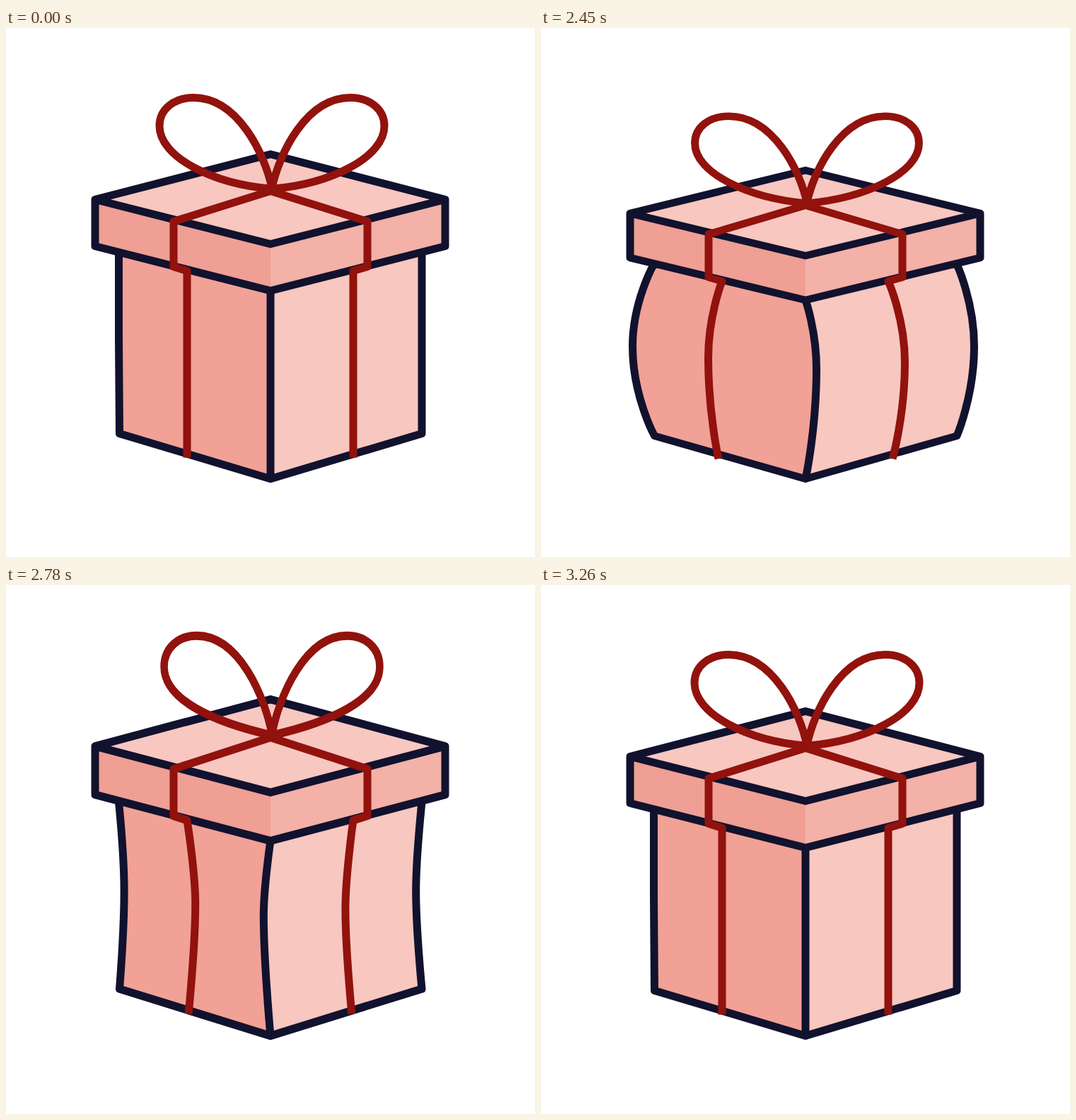
An HTML page that plays this animation: 748x748 px, repeating every 3.35 s.

```html
<!DOCTYPE html>
<html>
<head>
<meta charset="utf-8">
<style>
  html, body { margin: 0; height: 100%; overflow: hidden; background: #fff; }
  svg { display: block; width: 100vw; height: 100vh; }
  .line { fill: none; stroke: #11122e; stroke-width: 11; stroke-linejoin: round; stroke-linecap: round; }
  .ribbon { fill: none; stroke: #92120d; stroke-width: 11; stroke-linejoin: round; }
</style>
</head>
<body>
<svg viewBox="0 0 748 748">
  <g id="gift">
    <path id="body" fill="#f1a196"/>
    <path id="front" fill="#f7c7c0"/>
    <path id="edges" class="line"/>
    <path fill="#ef9f94" d="M126 242L374 305V371L126 308Z"/>
    <path fill="#f3b1a8" d="M621 242L374 305V371L621 308Z"/>
    <path fill="#f7c7c0" d="M126 242L374 178L621 242L374 305Z"/>
    <path class="line" d="M126 242L374 178L621 242L374 305ZV308L374 371L621 308V242"/>
    <path id="band" class="ribbon"/>
    <g id="bow" class="ribbon">
      <path id="loop"/>
      <use href="#loop" transform="matrix(-1 0 0 1 752 0)"/>
    </g>
  </g>
</svg>
<script>
const LOOP = 3350, START = 2000, STEP = 30, LAST = 42;
const set = (id, name, value) => document.getElementById(id).setAttribute(name, value);

// [step, value] keys with linear motion between them
const stretchKeys = [[0, 1], [8, .9677], [16, .948], [22.5, 1.061], [24, 1.061], [29, 1], [32, .988], [37, 1.005], [42, 1]];
const bulgeKeys = [[0, 0], [8, 1], [16, 1], [23, -1], [24, -1], [29, -.23], [32, .1], [37, -.04], [42, 0]];
const bowKeys = [[0, 0], [8, 1], [15.5, 0], [24, 1], [32, 0], [42, 0]];

function at(keys, step) {
  const i = Math.max(1, keys.findIndex(k => k[0] >= step));
  const [t0, v0] = keys[i - 1], [t1, v1] = keys[i];
  return v0 + (v1 - v0) * (step - t0) / (t1 - t0);
}

// Bent edge from a to b through the middle point m
function bend(a, m, b, bulge) {
  const round = .55 * Math.abs(bulge);
  const before = m[1] + (a[1] - m[1]) * round;
  const after = m[1] + (b[1] - m[1]) * round;
  return `${a}C${a} ${m[0]} ${before} ${m}C${m[0]} ${after} ${b} ${b}`;
}

function draw(step) {
  const stretch = at(stretchKeys, step), bulge = at(bulgeKeys, step), lift = at(bowKeys, step);
  const shift = (out, back) => bulge > 0 ? bulge * out : -bulge * back;

  const left = bend([159.5, 318], [159.5 + shift(-30, 11), 440], [160.5, 573], bulge);
  const right = bend([588, 573], [588 + shift(24.5, -12), 440], [588, 318], bulge);
  const middle = bend([374, 371], [374 + shift(15.5, -14), 473], [374, 637], bulge);
  const outline = `M${left}L374 637L${right}Z`;
  set('body', 'd', outline);
  set('front', 'd', `M${middle}L${right}Z`);
  set('edges', 'd', `${outline}M${middle}`);

  const bandLeft = bend([256 + shift(-5, 3), 607], [256 + shift(-19.5, 17), 457], [256, 343], bulge);
  const bandRight = bend([491, 343], [491 + shift(23.5, -16), 464], [491 + shift(6, -3), 607], bulge);
  set('band', 'd', `M${bandLeft}L237 337V273L374 230L511 273V337L${bandRight}`);

  set('loop', 'd', `M376 226C366 178 328 98 265 98C238 98 217 114 217 138C217 182 292 ${220 - 13 * lift} 376 227`);
  set('bow', 'transform',
    `translate(376 226) scale(${1 - .055 * lift} ${1 + .07 * lift}) translate(-376 -226)`);
  set('gift', 'transform', `translate(0 638.5) scale(1 ${stretch}) translate(0 -638)`);
}

function tick() {
  const step = Math.floor((performance.now() % LOOP - START) / STEP);
  draw(Math.min(LAST, Math.max(0, step)));
  requestAnimationFrame(tick);
}
tick();
</script>
</body>
</html>
```
